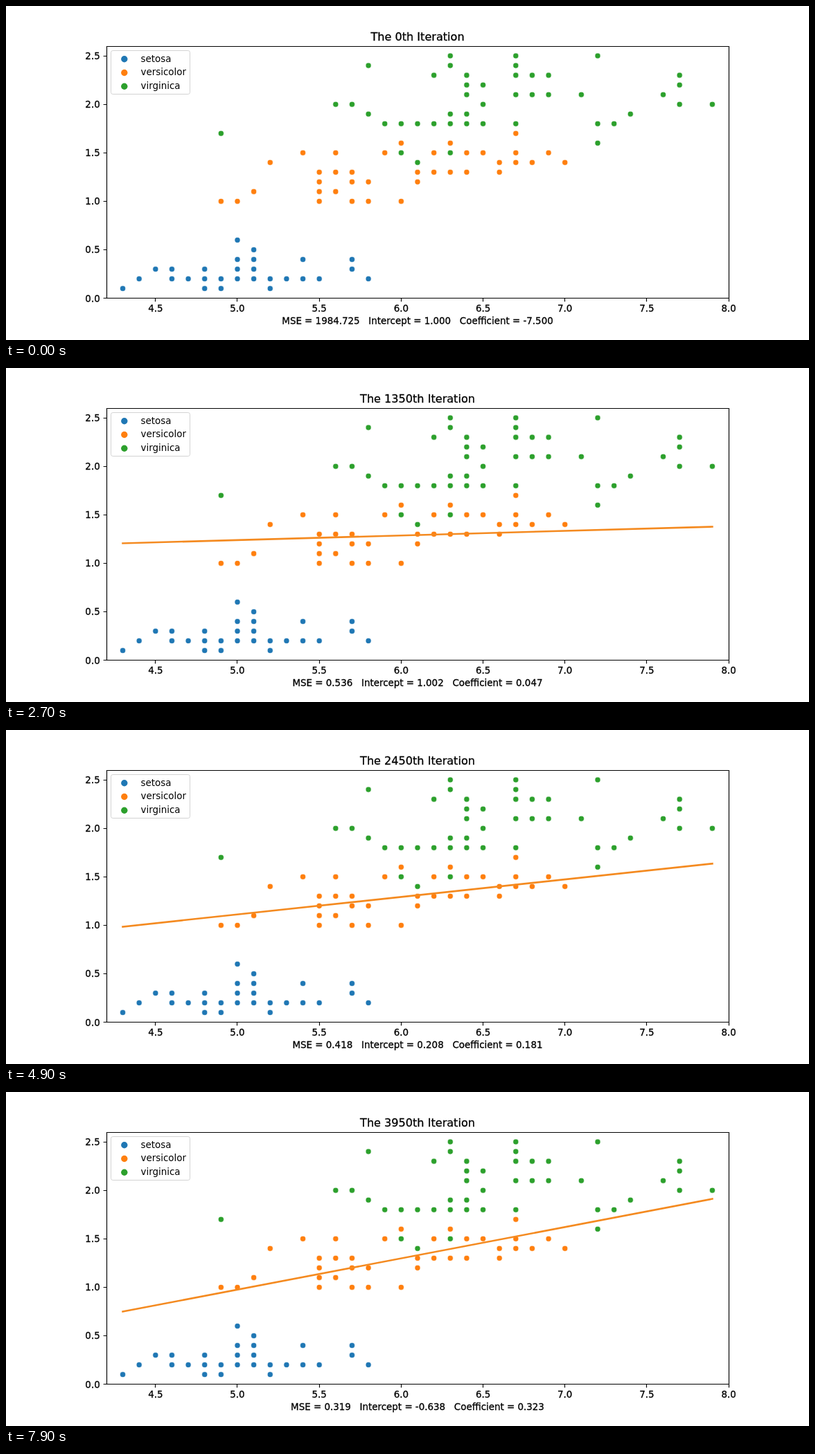
An HTML page that plays this animation: 1159 by 483 pixels, repeating every 8 s.

```html
<!DOCTYPE html>
<html lang="en">
<head>
<meta charset="utf-8">
<title>Gradient descent</title>
<style>
  html, body { margin: 0; width: 100%; height: 100%; overflow: hidden; background: #fff; }
  svg { display: block; width: 1159px; height: 483px; }
  text { font: 13.42px "DejaVu Sans", sans-serif; white-space: pre; }
  .bold text { stroke: #000; stroke-width: .3px; text-anchor: middle; }
  .bold .y { text-anchor: end; }
  #title { font-size: 16.1px; }
  #axes { fill: none; stroke: #000; stroke-width: 1.15; }
  #dots circle { stroke: #fff; stroke-width: .65; }
  #fit { stroke: #f48a20; stroke-width: 2.6; stroke-linecap: square; }
</style>
</head>
<body>
<svg viewBox="0 0 1159 483">
  <clipPath id="area"><rect x="145" y="58" width="898.5" height="364.6"/></clipPath>
  <g id="dots"></g>
  <line id="fit" clip-path="url(#area)"/>
  <path id="axes"/>
  <g id="labels" class="bold">
    <text id="title" x="594" y="50.2"></text>
    <text id="stats" x="594" y="460.4"></text>
  </g>
  <g id="legend">
    <rect x="151.5" y="64.5" width="114" height="63" rx="2.7" fill="#fff" fill-opacity=".8" stroke="#ccc" stroke-opacity=".85"/>
  </g>
</svg>
<script>
const $ = id => document.getElementById(id);
const sx = x => 144.9 + (x - 4.2) * 236.37;
const sy = y => 422.6 - y * 140.2;

function add(parent, tag, attrs, text = '') {
  const el = document.createElementNS('http://www.w3.org/2000/svg', tag);
  for (const k in attrs) el.setAttribute(k, attrs[k]);
  el.textContent = text;
  parent.append(el);
}

// Each species: rows of y -> x values, both in tenths.
const species = [
  ['setosa', '#1f77b4', {
    1: [43, 48, 49, 52],
    2: [44, 46, 47, 48, 49, 50, 51, 52, 53, 54, 55, 58],
    3: [45, 46, 48, 50, 51, 57],
    4: [50, 51, 54, 57],
    5: [51],
    6: [50]
  }],
  ['versicolor', '#ff7f0e', {
    10: [49, 50, 55, 57, 58, 60],
    11: [51, 55, 56],
    12: [55, 57, 58, 61],
    13: [55, 56, 57, 61, 62, 63, 64, 66],
    14: [52, 66, 67, 68, 70],
    15: [54, 56, 59, 62, 64, 65, 67, 69],
    16: [60, 63],
    17: [67]
  }],
  ['virginica', '#2ca02c', {
    14: [61],
    15: [60, 63],
    16: [72],
    17: [49],
    18: [59, 60, 61, 62, 63, 64, 65, 67, 72, 73],
    19: [58, 63, 64, 74],
    20: [56, 57, 65, 77, 79],
    21: [64, 67, 68, 69, 71, 76],
    22: [64, 65, 77],
    23: [62, 64, 67, 68, 69, 77],
    24: [58, 63, 67],
    25: [63, 67, 72]
  }]
];

species.forEach(([name, fill, rows], i) => {
  for (const y in rows)
    for (const x of rows[y])
      add($('dots'), 'circle', { cx: sx(x / 10), cy: sy(y / 10), r: 4.02, fill });
  const top = 76.8 + i * 19.7;
  add($('legend'), 'circle', { cx: 170.8, cy: top, r: 4.7, fill });
  add($('legend'), 'text', { x: 194.6, y: top + 3.9 }, name);
});

const snap = v => Math.floor(v) + .5;
let axes = 'M145.5 58.5H1043.5V422.5H145.5Z';
for (let v = 4.5; v <= 8; v += .5) {
  axes += `M${snap(sx(v))} 422.5v4.9`;
  add($('labels'), 'text', { x: sx(v), y: 442.4 }, v.toFixed(1));
}
for (let v = 0; v <= 2.5; v += .5) {
  axes += `M145.5 ${snap(sy(v))}h-4.9`;
  add($('labels'), 'text', { x: 135.7, y: sy(v) + 4.9, class: 'y' }, v.toFixed(1));
}
$('axes').setAttribute('d', axes);

// Gradient descent from the sample moments, kept every 50 iterations.
const mx = 876.5 / 150, my = 179.9 / 150;
const vx = .681122, vy = .577133, cov = .512829;
const rate = .01, states = [];
let b = 1, a = -7.5;
for (let n = 0; n < 4000; n++) {
  const r = b + a * mx - my;
  if (n % 50 === 0) states.push({ n, a, b, mse: r * r + vy - 2 * a * cov + a * a * vx });
  b -= rate * r;
  a -= rate * (r * mx + a * vx - cov);
}

let shown = -1;
function draw() {
  const step = Math.floor(performance.now() % 8000 / 100);
  if (step !== shown) {
    shown = step;
    const { n, a, b, mse } = states[step];
    const ends = { x1: sx(4.3), y1: sy(b + a * 4.3), x2: sx(7.9), y2: sy(b + a * 7.9) };
    for (const k in ends) $('fit').setAttribute(k, ends[k]);
    $('title').textContent = `The ${n}th Iteration`;
    $('stats').textContent =
      `MSE = ${mse.toFixed(3)}   Intercept = ${b.toFixed(3)}   Coefficient = ${a.toFixed(3)}`;
  }
  requestAnimationFrame(draw);
}
draw();
</script>
</body>
</html>
```
